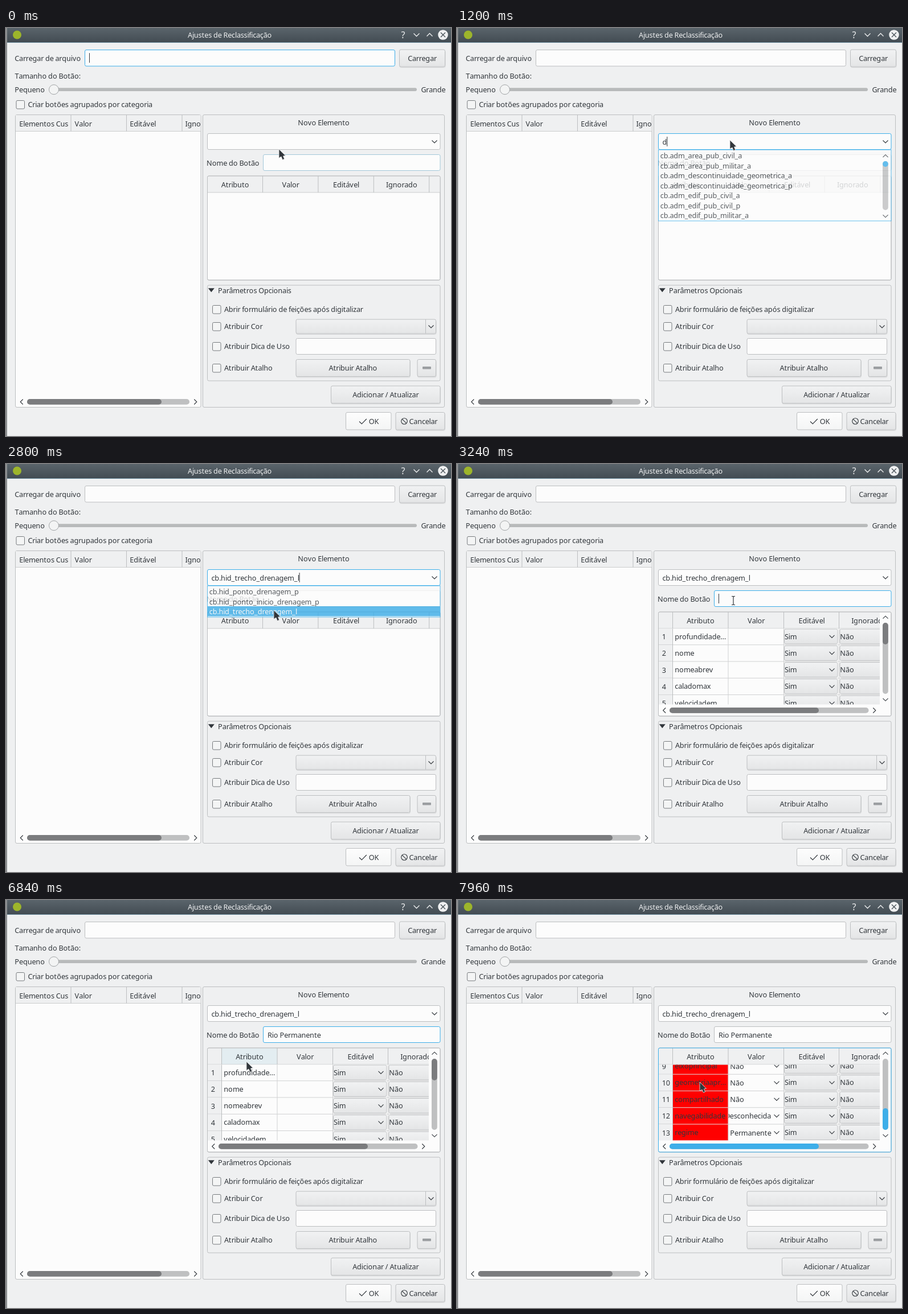
Write an HTML page that moves like this. It is 781 px wide and 717 px high and loops after 8000 ms.

```html
<!DOCTYPE html>
<html lang="pt">
<head>
<meta charset="utf-8">
<title>Ajustes de Reclassificação</title>
<style>
html, body { margin: 0; width: 100%; height: 100%; overflow: hidden; background: #eff0f1; }
svg { display: block; width: 781px; height: 717px; }
text { font: 12.675px "Noto Sans", sans-serif; font-variant-ligatures: none; font-kerning: none; white-space: pre; }
</style>
</head>
<body>
<svg id="stage" viewBox="0 0 781 717"></svg>
<script>
const LOOP = 8000, STEP = 40, SCALE = 0.975;
const INK = '#31363b', PAPER = '#fcfcfc', PANEL = '#eff0f1', LINE = '#bcbec0', BLUE = '#3daee9',
  HOVER = '#93cee9', GROOVE = '#bfc0c1', HANDLE = '#7b7c7e';

// ---- text: every glyph advance is rounded to whole pixels at 13px, then scaled
const pen = document.createElement('canvas').getContext('2d');
pen.font = '100px "Noto Sans", sans-serif';
const advances = {};
const advance = ch => advances[ch] ??= Math.round(pen.measureText(ch).width * 0.13) * SCALE;
const widthOf = s => [...s].reduce((w, ch) => w + advance(ch), 0);
const glyphXs = (x, s) => [...s].map(ch => { const at = x; x += advance(ch); return at.toFixed(2); }).join(' ');

// ---- drawing helpers, each returns markup
const text = (x, mid, s, fill = INK) =>
  `<text x="${glyphXs(x, s)}" y="${mid + 4.6}" fill="${fill}">${s}</text>`;
const centred = (x, mid, s, fill) => text(x - widthOf(s) / 2, mid, s, fill);
const rect = (x, y, w, h, fill, extra = '') =>
  `<rect x="${x}" y="${y}" width="${w}" height="${h}" fill="${fill}" ${extra}/>`;
const frame = (x, y, w, h, fill = PAPER, extra = '') =>
  rect(x, y, w, h, fill, `rx="2.5" stroke="${LINE}" ${extra}`);
const line = (x1, y1, x2, y2, stroke = LINE) => `<path d="M${x1} ${y1}L${x2} ${y2}" stroke="${stroke}"/>`;
const stroke = (d, color = INK, w = 1.1) => `<path d="${d}" fill="none" stroke="${color}" stroke-width="${w}"/>`;
const chevron = (x, y, turn = 0, color = INK) =>
  `<path d="M-4.5 -2.2L0 2.3L4.5 -2.2" transform="translate(${x} ${y}) rotate(${turn})" fill="none" stroke="${color}" stroke-width="1.1"/>`;
const group = (id, body, extra = '') => `<g id="${id}" ${extra}>${body}</g>`;
const check = (x, mid, s) =>
  rect(x + .5, mid - 7, 14.5, 14.5, '#f4f5f5', 'rx="2" stroke="#777b7e"') + text(x + 21, mid, s);
const button = (x, y, w, h, label = '') =>
  rect(x + .5, y + 1.5, w, h, 'none', 'rx="2.5" stroke="#d5d6d7"') +
  frame(x, y, w, h, 'url(#face)') + (label && centred(x + w / 2, y + h / 2, label));
const pill = (x, y, w, h, fill, id = '') => rect(x, y, w, h, fill, `rx="5" ${id && `id="${id}"`}`);
const clip = (id, x, y, w, h) => `<clipPath id="${id}">${rect(x, y, w, h, '#000')}</clipPath>`;

function titleBar() {
  return rect(2, 0, 779, 25, 'url(#bar)') + rect(2, 25, 779, 1, '#6f8fa0') +
    '<circle cx="19.5" cy="12" r="7.5" fill="#9db52b"/>' +
    centred(392.7, 12, 'Ajustes de Reclassificação', PANEL) +
    `<text x="697" y="17.5" text-anchor="middle" fill="${PANEL}" style="font-size:16px">?</text>` +
    [[720.5, 0], [743.5, 180]].map(([x, turn]) =>
      `<g transform="translate(${x} 12) rotate(${turn})">${stroke('M-5 -2.5L0 2.5L5 -2.5', PANEL, 1.3)}</g>`).join('') +
    `<circle cx="767" cy="12" r="8.8" fill="${PANEL}"/>` + stroke('M763 8L771 16M771 8L763 16', '#475057', 1.3);
}

function leftSide() {
  return text(15.3, 53, 'Carregar de arquivo') + frame(138.5, 38.5, 544, 28.5, PAPER, 'id="file"') +
    button(690.5, 38, 80, 30, 'Carregar') +
    text(15.6, 84, 'Tamanho do Botão:') + text(15.3, 108, 'Pequeno') + text(728.5, 108, 'Grande') +
    rect(77, 105.2, 644, 5.8, '#b8babb', 'rx="2.9"') +
    '<circle cx="84" cy="108.2" r="8.5" fill="#f3f4f4" stroke="#a2a5a7"/>' +
    check(17.5, 134.5, 'Criar botões agrupados por categoria') +
    frame(16.5, 152.5, 325.5, 514) + rect(17, 153, 324.5, 28.5, PANEL) +
    line(17, 181.5, 342, 181.5, '#cbcdce') +
    [114, 211.5, 309].map(x => line(x, 153, x, 181.5)).join('') +
    text(23.3, 168, 'Elementos Cus') + text(120.5, 168, 'Valor') + text(217.3, 168, 'Editável') + text(314.6, 168, 'Igno') +
    chevron(27.5, 657, 90) + chevron(332.5, 657, -90) +
    pill(37, 652, 285, 9.8, GROOVE) + pill(37, 652, 236, 9.8, HANDLE);
}

function options() {
  return frame(353.5, 452, 408.5, 168, 'none') + `<path d="M354.8 457.3H365.8L360.3 464.3Z" fill="${INK}"/>` +
    text(372, 461, 'Parâmetros Opcionais') +
    check(362, 494.5, 'Abrir formulário de feições após digitalizar') + check(362, 524.5, 'Atribuir Cor') +
    check(362, 559.5, 'Atribuir Dica de Uso') + check(362, 597.5, 'Atribuir Atalho') +
    button(509, 512, 245.5, 25) + line(736.5, 512, 736.5, 537) + chevron(746, 524.7) +
    frame(509, 545.5, 245.5, 28) + button(509, 582.5, 200, 30, 'Atribuir Atalho') +
    button(722, 582.5, 32.5, 30) + rect(731, 595, 15, 4.5, '#9b9ea1', 'rx="1"') +
    button(570.5, 629, 191.5, 30.5, 'Adicionar / Atualizar') +
    frame(596.5, 675.5, 79.5, 30.5, 'url(#lit)') + stroke('M620 691.5L624.3 695.7L632.8 687') + text(636.7, 691.3, 'OK') +
    button(684, 675.5, 86, 30.5) + '<circle cx="699" cy="691" r="5.3" fill="none" stroke="#31363b" stroke-width="1.1"/>' +
    stroke('M695.3 687.3L702.7 694.7') + text(707.5, 691.3, 'Cancelar');
}

// ---- attribute table
const ATTRS = ['profundidade…', 'nome', 'nomeabrev', 'caladomax', 'velocidadem…', 'larguramedia', 'coincidecom…',
  'dentrodepoli…', 'eixoprincipal', 'geometriaapr…', 'compartilhado', 'navegabilidade', 'regime'];
const FIRST_RED = 6, ROW_H = 29.25, ROW_TOP = 288.5;
const GRID = '#d0d1d2', HEADS = ['Atributo', 'Valor', 'Editável', 'Ignorado'];

const emptyTable = () => rect(354, 260.5, 408, 28.5, PANEL) + line(354, 289, 762, 289, '#cbcdce') +
  HEADS.map((s, i) => centred(402.2 + 97.4 * i, 275, s) + line(450.5 + 97.4 * i, 260, 450.5 + 97.4 * i, 289)).join('');

function row(name, i) {
  const top = ROW_TOP + ROW_H * i, mid = top + 14.6, red = i >= FIRST_RED;
  const value = { 11: 'Desconhecida', 12: 'Permanente' }[i] || 'Não';
  const left = i === 11 ? 551 - widthOf(value) : 479.3;
  return rect(354, top, 24.5, ROW_H, PANEL) + line(354, top + ROW_H, 378.5, top + ROW_H, LINE) +
    line(378.5, top + ROW_H, 742, top + ROW_H, GRID) + text(359.8, mid + .5, String(i + 1)) +
    (red ? rect(379, top + .5, 96.8, ROW_H - 1, '#f00') : '') + text(382.3, mid, name) +
    (red ? `<g clip-path="url(#valueCol)">${text(left, mid + .3, value)}</g>` + chevron(561, mid) : '') +
    frame(574.5, mid - 13, 93.5, 26, 'url(#face)') + text(575, mid, 'Sim') + chevron(658, mid) +
    frame(672, mid - 13, 93.5, 26, 'url(#face)') + text(672.3, mid, 'Não');
}

function fullTable() {
  const cols = [378.5, 476, 573.5, 670.5];
  return `<g clip-path="url(#rowsArea)">${group('rows', ATTRS.map(row).join(''))}` +
    cols.map((x, i) => line(x, 289, x, 423, i ? GRID : LINE)).join('') + '</g>' +
    `<g clip-path="url(#headArea)">${rect(354, 260.5, 388.5, 28.5, PANEL)}` +
    rect(379, 260.5, 97, 28.5, '#e3edf1', 'id="headHover"') + line(354, 289, 742, 289, '#cbcdce') +
    cols.map((x, i) => line(x, 260, x, 289) + centred(x + 49, 275, HEADS[i])).join('') + '</g>' +
    chevron(752, 269.5, 180) + chevron(752, 414) + pill(747, 279, 9.8, 125, GROOVE) + pill(747, 279, 9.8, 38, HANDLE, 'vbar') +
    chevron(364, 433, 90) + chevron(732.5, 433, -90) + pill(373, 428, 349.5, 9.8, GROOVE) + pill(373, 428, 262, 9.8, HANDLE, 'hbar');
}

function rightSide() {
  return frame(345.5, 152.5, 424, 514, 'none') + centred(557.5, 166, 'Novo Elemento') +
    frame(353.5, 185.5, 408.5, 28, PAPER, 'id="combo"') + chevron(752, 199.7) + text(360.5, 200, ' ').replace('<text', '<text id="comboText"') +
    text(352, 237, 'Nome do Botão') + frame(451.5, 222.5, 310.5, 28, PAPER, 'id="name"') +
    text(459, 237, ' ').replace('<text', '<text id="nameText"') +
    frame(353.5, 260, 408.5, 183) + group('empty', emptyTable()) + group('full', fullTable()) +
    rect(353.5, 260, 408.5, 183, 'none', `id="tableEdge" rx="2.5" stroke="${LINE}"`) + options();
}

// ---- completion popup
const POP_TOP = 215.5, POP_ROW = 17.5;
const DRAIN = ['cb.hid_ponto_drenagem_p', 'cb.hid_ponto_inicio_drenagem_p', 'cb.hid_trecho_drenagem_l'];
const LISTS = [
  ['area_pub_civil_a', 'area_pub_militar_a', 'descontinuidade_geometrica_a', 'descontinuidade_geometrica_p',
    'edif_pub_civil_a', 'edif_pub_civil_p', 'edif_pub_militar_a'].map(s => 'cb.adm_' + s),
  [...['a', 'l', 'p'].map(s => 'cb.enc_hidreletrica_' + s), ...DRAIN],
  DRAIN
];
function popup(items, hot) {
  const h = items.length * POP_ROW + 3.5;
  return rect(353.5, 214, 408.5, h - 1, PAPER, `stroke="${BLUE}"`) +
    items.map((s, i) => {
      const y = POP_TOP + i * POP_ROW;
      return (i === hot ? rect(353.5, y - .5, 408.5, POP_ROW, BLUE) : '') + text(356.8, y + 9, s, i === hot ? PAPER : INK);
    }).join('') +
    (items.length > 6 ? chevron(752, 225, 180) + chevron(752, 330.5) + pill(747, 234, 9.8, 86, GROOVE) + pill(747, 234, 9.8, 10, BLUE) : '');
}

// ---- timeline
const TYPED_COMBO = [[0, ''], [920, 'd'], [1320, 'dr'], [1480, 'dre'], [1560, 'dren'], [2760, DRAIN[2]]];
const KEY_TIMES = [3920, 4160, 4320, 4640, 4920, 5040, 5240, 5400, 5480, 5640, 5720, 5880, 6000, 6120];
const NAME = 'Rio Permanente';
const POINTER = [[0, 479, 213], [40, 479, 213], [240, 479, 197], [2200, 479, 197], [2680, 470, 257], [3000, 470, 257],
  [3160, 485, 240], [6560, 485, 240], [6840, 422, 284], [7080, 422, 284], [7280, 418, 316], [7920, 418, 316], [7960, 426, 320]];
const SCROLL = [[0, 0], [7360, 79], [7480, 158], [7640, 237], [7760, 245.5]];
const MAX_SCROLL = 245.5;

const ramp = (t, a, b) => Math.min(1, Math.max(0, (t - a) / (b - a)));
const held = (steps, t) => steps.filter(s => s[0] <= t).pop()[1];
function pointerAt(t) {
  const i = POINTER.findIndex(p => p[0] > t);
  if (i < 0) return POINTER.at(-1).slice(1);
  const [a, b] = [POINTER[i - 1], POINTER[i]], k = ramp(t, a[0], b[0]), e = k * k * (3 - 2 * k);
  return [a[1] + (b[1] - a[1]) * e, a[2] + (b[2] - a[2]) * e];
}
function mix(a, b, k) {
  const part = (c, i) => parseInt(c.slice(i, i + 2), 16);
  return '#' + [1, 3, 5].map(i => Math.round(part(a, i) + (part(b, i) - part(a, i)) * k).toString(16).padStart(2, '0')).join('');
}

document.getElementById('stage').innerHTML = `<defs>
  <linearGradient id="bar" x2="0" y2="1"><stop stop-color="#5a646b"/><stop offset="1" stop-color="#434c53"/></linearGradient>
  <linearGradient id="face" x2="0" y2="1"><stop stop-color="#f1f2f3"/><stop offset="1" stop-color="#e4e5e6"/></linearGradient>
  <linearGradient id="lit" x2="0" y2="1"><stop stop-color="#fdfdfd"/><stop offset="1" stop-color="#f4f5f5"/></linearGradient>
  ${clip('rowsArea', 354, 289.5, 388, 133)}${clip('headArea', 354, 260, 388, 29.5)}${clip('valueCol', 476.5, 250, 75.5, 460)}
  </defs>` + rect(0, 0, 781, 717, PANEL) + rect(0, 0, 2, 717, '#8d9092') +
  titleBar() + leftSide() + rightSide() + group('popup', '') +
  rect(0, 0, 1, 17, INK, 'id="caret"') +
  group('arrow', `<path d="M0 0V15.5L4 13L6.3 18.6L9.6 17.2L7.5 12L11.5 11.3Z" fill="${INK}" stroke="#e8e9ea" stroke-width=".8"/>`) +
  group('beam', stroke('M-3 -7.5H-1L0 -6.5L1 -7.5H3M0 -6.5V6.5M-3 7.5H-1L0 6.5L1 7.5H3', INK, 1.2));

const el = Object.fromEntries([...document.querySelectorAll('[id]')].map(n => [n.id, n]));
const show = (node, on) => node.setAttribute('visibility', on ? 'visible' : 'hidden');
const edge = (node, color) => node.setAttribute('stroke', color);
const place = (node, x, y) => node.setAttribute('transform', `translate(${x.toFixed(2)} ${y.toFixed(2)})`);
function write(node, x, s) {
  node.textContent = s;
  node.setAttribute('x', glyphXs(x, s) || x);
}

let popupKey = '';
function draw(t) {
  const [px, py] = pointerAt(t);
  const combo = held(TYPED_COMBO, t), name = NAME.slice(0, KEY_TIMES.filter(k => k <= t).length);
  write(el.comboText, 360.5, combo);
  write(el.nameText, 459, name);

  // focus and hover glow
  const tableFocus = ramp(t, 7320, 7480), comboIn = ramp(t, 440, 560), nameIn = ramp(t, 3120, 3240);
  const over = ramp(t, 40, 240) * (1 - ramp(t, 2960, 3080));
  edge(el.file, mix(BLUE, LINE, comboIn));
  edge(el.combo, mix(mix(LINE, HOVER, over), BLUE, comboIn * (1 - nameIn)));
  edge(el.name, mix(mix(LINE, HOVER, .6 * (1 - ramp(t, 0, 160))), BLUE, nameIn * (1 - tableFocus)));
  edge(el.tableEdge, mix(LINE, BLUE, tableFocus));
  for (const bar of [el.vbar, el.hbar]) bar.setAttribute('fill', mix(HANDLE, BLUE, tableFocus));

  // table
  const filled = t >= 2960, scroll = held(SCROLL, t);
  el.empty.style.display = filled ? 'none' : '';
  el.full.style.display = filled ? '' : 'none';
  show(el.headHover, px > 379 && px < 476 && py > 260 && py < 289);
  place(el.rows, 0, -scroll);
  el.vbar.setAttribute('y', 279 + 87 * scroll / MAX_SCROLL);

  // popup
  const list = t < 1320 ? 0 : t < 1560 ? 1 : 2, hot = py < POP_TOP ? -1 : Math.floor((py - POP_TOP) / POP_ROW);
  if (popupKey !== list + ':' + hot) {
    popupKey = list + ':' + hot;
    el.popup.innerHTML = popup(LISTS[list], hot);
  }
  const alpha = ramp(t, 1040, 1240) * (1 - ramp(t, 2760, 2960));
  el.popup.setAttribute('opacity', alpha);
  show(el.popup, alpha > 0);

  // caret
  const caret = t < 480 ? [146, 44] : t < 3160 ? [360.5 + widthOf(combo), 191] : [459 + widthOf(name), 228];
  place(el.caret, ...caret);
  show(el.caret, !(t >= 3640 && t < 3920) && t < 6600);

  // pointer
  const inName = filled && px > 451 && py > 222 && py < 251;
  show(el.beam, inName);
  show(el.arrow, !inName);
  place(inName ? el.beam : el.arrow, px, py);
}

const start = performance.now();
function tick() {
  const t = (performance.now() - start) % LOOP;
  draw(Math.floor(t / STEP) * STEP);
  requestAnimationFrame(tick);
}
tick();
</script>
</body>
</html>
```
